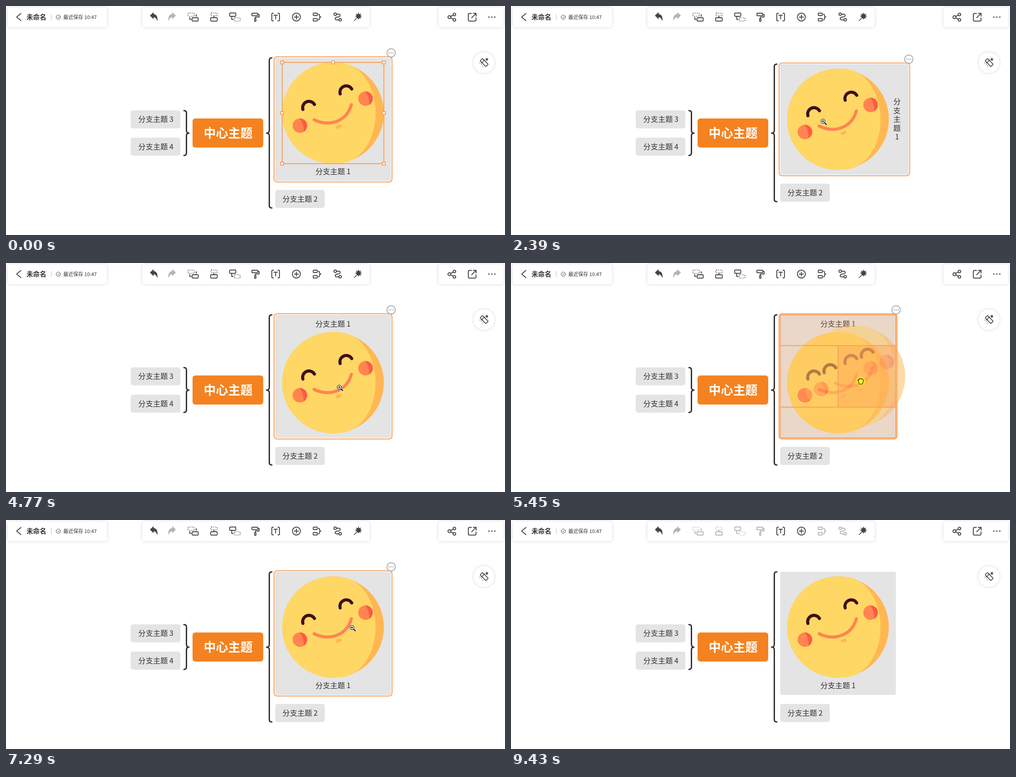
These frames come from a looping animation (1102x508 px, 9700 ms). An HTML page:

```html
<!DOCTYPE html>
<html lang="zh">
<head>
<meta charset="utf-8">
<title>Mind map</title>
<style>
  html, body { margin: 0; width: 100%; height: 100%; overflow: hidden; background: #fff; }
  svg { display: block; width: 1102px; height: 508px; }
  text { font: 350 16.3px "Noto Sans CJK SC", "Noto Sans CJK", sans-serif; fill: #333; text-anchor: middle; }
  .card { fill: #fff; filter: drop-shadow(0 0 3px rgba(0, 0, 0, .16)); }
  .node { fill: #e4e4e4; }
  .line, .icon { fill: none; stroke: #444; stroke-width: 1.9; stroke-linecap: round; stroke-linejoin: round; }
  .icon .solid { fill: #444; }
  .icon .dash { stroke-dasharray: 1.6 2.3; stroke-width: 1.7; stroke-linecap: butt; }
  .off .tool { stroke: #b4b4b4; }
  .off .tool .solid { fill: #b4b4b4; }
  .brace { fill: none; stroke: #333; stroke-width: 3; stroke-linecap: round; stroke-linejoin: round; }
  .accent { fill: none; stroke: #fa9f5a; stroke-width: 2; }
  .feature { fill: none; stroke-width: 6.8; stroke-linecap: round; }
  .zone { fill: #ff9f57; }
  #cursor { stroke: #111; stroke-width: 1.1; stroke-linejoin: round; fill: #fff; }
  #cursor.down { fill: #ffee3a; }
  #halo { fill: #f7e31f; fill-opacity: .88; stroke: none; }
</style>
</head>
<body>
<svg id="stage" viewBox="0 0 1102 508">
  <defs>
    <g id="cheek">
      <circle r="16" fill="#ff8450"/>
      <path d="M-1-16A16 16 0 0 1 8 13.9Q10-3-1-16Z" fill="#ff5a44"/>
    </g>
    <g id="face">
      <circle r="112.3" fill="#ffb752"/>
      <path d="M14-111.4A80 111.4 0 0 1 14 111.4A112.3 112.3 0 1 1 14-111.4Z" fill="#ffd765"/>
      <g class="feature" stroke="#3d1016">
        <path id="eye" d="M-66.5-8A14 14 0 0 1-41-19"/>
        <use href="#eye" x="82.3" y="-34.4"/>
      </g>
      <use href="#cheek" x="-73.2" y="28"/>
      <use href="#cheek" x="71.8" y="-32"/>
      <path class="feature" stroke="#ff8450" d="M-41.5 15C-10 31 30 20 40.5-18.5"/>
      <path class="feature" stroke="#ffb752" d="M9.5 31.5L15.5 29"/>
    </g>
  </defs>

  <!-- map -->
  <rect class="node" x="275.5" y="231.5" width="109.5" height="40" rx="5"/>
  <rect class="node" x="275.5" y="292" width="109.5" height="40" rx="5"/>
  <text x="331" y="257">分支主题 3</text>
  <text x="331" y="318">分支主题 4</text>
  <path class="brace" d="M393 232Q398.5 232 398.5 237V276Q398.5 282 404 282Q398.5 282 398.5 288V326Q398.5 331.5 393 331.5"/>
  <rect x="412" y="249.5" width="156" height="64.5" rx="6" fill="#f58220"/>
  <text x="490.5" y="292" style="font-size:27px;font-weight:700;fill:#fff">中心主题</text>
  <path class="brace" id="brace"/>
  <g id="second">
    <rect class="node" x="594.5" width="109.5" height="40" rx="5"/>
    <text x="649.5" y="26">分支主题 2</text>
  </g>
  <rect class="node" id="panel" x="594.5" rx="4"/>
  <use href="#face" id="image"/>
  <text id="across">分支主题 1</text>
  <text id="upright"></text>
  <g id="chosen">
    <rect class="accent" id="outline" x="592" rx="7"/>
    <g id="more">
      <circle r="9.3" fill="#fff" stroke="#aaa" stroke-width="1.9"/>
      <path d="M-4.3 0h.01M0 0h.01M4.3 0h.01" stroke="#999" stroke-width="2.4" stroke-linecap="round"/>
    </g>
  </g>
  <g id="handles" class="accent"><rect x="-112.3" y="-112.3" width="224.6" height="224.6"/></g>
  <use href="#face" id="ghost" opacity=".5"/>
  <g id="drop">
    <rect class="zone" id="wash" opacity=".2"/>
    <rect class="zone" id="target" opacity=".37"/>
    <path class="accent" id="grid"/>
  </g>

  <!-- bars -->
  <rect class="card" x="4" y="3" width="219" height="44" rx="5"/>
  <rect class="card" x="301" y="3" width="502" height="44" rx="5"/>
  <rect class="card" x="955" y="3" width="144" height="44" rx="5"/>
  <circle class="card" cx="1055.5" cy="125.5" r="23"/>
  <text x="67.2" y="29.5" style="font-size:14.7px;font-weight:700">未命名</text>
  <text x="163.5" y="28.5" style="font-size:11px">最近保存 10:47</text>
  <path d="M100 18V31" stroke="#bbb"/>
  <g class="icon">
    <path d="M33 16.5L23.5 24.5L33 32.5"/>
    <g stroke-width="1"><circle cx="115.6" cy="24.8" r="4.8"/><path d="M113.3 24.8l1.8 1.8 3-3.4"/></g>
    <path id="undo" class="solid" stroke-width="1" d="M318.5 21L325.5 14.5V18.3C331.5 18.6 334.5 23 334 32C332 27 330 24.7 325.5 24.5V28Z"/>
    <path d="M374.5 21L367.5 14.5V18.3C361.5 18.6 358.5 23 359 32C361 27 363 24.7 367.5 24.5V28Z" style="fill:#b4b4b4;stroke:#b4b4b4;stroke-width:1"/>
    <g class="tool">
      <rect class="dash" x="402" y="15.5" width="13.5" height="7.5" rx="1.5"/>
      <rect x="411" y="26" width="13.5" height="7.5" rx="1.5"/>
      <path d="M406 25.5V29.7H408.5M420 19.3V23"/>
    </g>
    <g class="tool">
      <rect class="dash" x="452.5" y="15.5" width="13.5" height="6.5" rx="1.5"/>
      <rect x="452" y="26" width="14.5" height="7.5" rx="1.5"/>
      <path d="M459.3 22.5V25.5"/>
    </g>
    <g class="tool">
      <rect x="494" y="15.5" width="13.5" height="7.5" rx="1.5"/>
      <rect class="dash" x="504" y="26" width="13" height="7.5" rx="1.5"/>
      <path d="M498.5 23.5V29.7H501.5"/>
    </g>
    <g class="tool">
      <rect x="543" y="16" width="13" height="5.5" rx="1"/>
      <path d="M556.5 18.7H559V24.5H550.5V27"/>
      <rect x="549" y="28" width="3" height="6" rx=".8"/>
    </g>
    <path d="M590.5 16H589Q587 16 587 18V31Q587 33 589 33H590.5M600.5 16H602Q604 16 604 18V31Q604 33 602 33H600.5M591.5 20.5H599.5M595.5 20.5V29"/>
    <circle cx="641.3" cy="24.5" r="8.8"/><path d="M636.8 24.5H645.8M641.3 20V29"/>
    <g class="tool">
      <rect x="678.5" y="15.8" width="9" height="5.5" rx="1"/>
      <rect x="678.5" y="27.8" width="9" height="5.5" rx="1"/>
      <path d="M690 18.5Q692.5 18.5 692.5 21V22.5Q692.5 24.5 695.5 24.5Q692.5 24.5 692.5 26.5V28Q692.5 30.5 690 30.5"/>
    </g>
    <g class="tool">
      <circle cx="727" cy="18.3" r="2.8"/><circle cx="738" cy="30.5" r="2.8"/>
      <path d="M730.5 18.3H735Q738.5 18.3 738 21.5Q737 24.5 732.5 24.5Q727.5 24.5 727 28Q727 30.8 730.5 30.8H734.5"/>
    </g>
    <g><circle class="solid" cx="778.5" cy="22.5" r="4.2"/>
      <path stroke-width="1.6" d="M778.5 15.5V29M771.7 22.5H785.3M773.7 17.7L783.3 27.3M783.3 17.7L769 32.5"/></g>
    <circle cx="979.3" cy="24.8" r="3.3"/><circle cx="990.3" cy="18.8" r="2.9"/><circle cx="990.3" cy="30.8" r="2.9"/>
    <path d="M982.3 23.2L987.7 20.2M982.3 26.4L987.7 29.4"/>
    <path d="M1028 16.5H1023.5Q1021 16.5 1021 19V31Q1021 33.5 1023.5 33.5H1035.5Q1038 33.5 1038 31V26.5M1032 16.2H1038.2V22.4M1038 16.4L1028.5 26"/>
    <path stroke-width="3" d="M1066.5 24.5h.01M1073 24.5h.01M1079.5 24.5h.01"/>
    <g transform="translate(1056 125.5)" style="stroke-width:1.7">
      <rect x="-9" y="-3.7" width="18" height="7.4" rx="1.2" transform="rotate(45)"/>
      <path d="M-6 1L1-6"/>
      <path class="solid" stroke-width=".6" d="M6-10.5l1 2 2 .6-1.6 1.4.2 2.2-1.8-1-2 .8.6-2-1.4-1.7 2.2-.2Z"/>
      <path d="M-9.5 1h.01M-6 4h.01M-3 8h.01"/>
    </g>
  </g>

  <g id="cursor">
    <circle id="halo" r="10"/>
    <path id="arrow" d="M0 0V15.5L3.7 12.2L6.2 17.7L8.5 16.7L6.1 11.4H11Z"/>
    <g id="zoom">
      <path d="M3.5 3L8 7.5" stroke="#fff" stroke-width="4.5"/>
      <circle cy="-.5" r="5.6" stroke="none"/>
      <path d="M3.5 3L8 7.5" stroke-width="2.4"/>
      <circle cy="-.5" r="4.6" stroke-width="1.2"/>
      <path d="M-2.5-.5H2.5M0-3V2" stroke-width="1.3"/>
    </g>
    <path id="hand" d="M-3.5 6.5Q-4-.5-6-1.5Q-6-3.5-3.6-2V-4Q-2.5-6.5-1-4.6Q.5-7 2-4.6Q4-6 4.6-3.6Q6.5-4 6 0Q5.8 3 4 6.5Z"/>
  </g>
</svg>
<script>
const LOOP = 9700;
const $ = id => document.getElementById(id);
const set = (id, attrs) => { for (const k in attrs) $(id).setAttribute(k, attrs[k]); };
const show = (id, on) => { $(id).style.display = on ? '' : 'none'; };
const move = (id, x, y) => set(id, { transform: `translate(${x} ${y})` });

// where the caption stands: box height, image centre, caption place
const LAYOUTS = {
  below: { y: 115, w: 255.5, h: 273, image: [722.2, 237.4], text: [722.2, 373] },
  above: { y: 115, w: 255.5, h: 273, image: [722.2, 265.4], text: [722.2, 141] },
  right: { y: 129, w: 283.5, h: 245, image: [722.2, 251.4], text: [852.5, 218], upright: true },
  left:  { y: 129, w: 283.5, h: 245, image: [750.2, 251.4], text: [620.5, 218], upright: true }
};
const STAGES = [[0, 'below'], [2390, 'right'], [3890, 'above'], [5720, 'left'], [7290, 'below']];
const DRAGS = [[1850, 2390], [3340, 3890], [5190, 5720], [6500, 7290]];
const PRESSES = [[1090, 1300], [1710, 2390], [2980, 3120], [3270, 3890], [4780, 4920],
  [5120, 5720], [6220, 6360], [6430, 7290], [7930, 8090]];
const HANDLES = [[0, 560], [1160, 1850], [3050, 3340], [4780, 5190], [6290, 6500]];
const DESELECT = 8020;

// pointer stops: time, x, y
const PATH = [
  [70, 1066, 496], [400, 900, 425], [540, 822, 388], [680, 750, 342], [890, 728, 250],
  [1500, 728, 250], [1640, 730, 247], [1850, 730, 247], [2060, 689, 256],
  [2660, 689, 256], [2900, 742, 276], [3340, 742, 276], [3690, 747, 298],
  [4220, 747, 298], [4600, 736, 276], [5190, 736, 276], [5450, 772, 262],
  [5790, 772, 262], [6070, 762, 264], [6500, 762, 264], [6960, 764, 239],
  [7360, 764, 239], [7850, 963, 298], [8950, 963, 298], [9430, 1080, 512]
];

const during = (spans, t) => spans.find(([a, b]) => t >= a && t < b);

function pointer(t) {
  const i = PATH.findIndex(p => p[0] > t);
  if (i < 0) return PATH[PATH.length - 1].slice(1);
  if (i === 0) return PATH[0].slice(1);
  const [a, x, y] = PATH[i - 1], [b, u, v] = PATH[i];
  const k = (t - a) / (b - a);
  return [x + (u - x) * k, y + (v - y) * k];
}

function layOut(name) {
  const { y, w, h, image, text, upright } = LAYOUTS[name];
  set('panel', { y, width: w, height: h });
  set('outline', { y: y - 2.5, width: w + 5, height: h + 5 });
  set('wash', { x: 594.5, y, width: w, height: h });
  move('more', 593.5 + w + 1.5, y - 11);
  move('image', ...image);
  move('handles', ...image);
  move('second', 0, y + h + 20);
  show('across', !upright);
  show('upright', upright);
  move(upright ? 'upright' : 'across', ...text);
  const end = y + h + 60;
  set('brace', { d: `M587 ${y}Q581.5 ${y} 581.5 ${y + 5}V276Q581.5 282 575.5 282Q581.5 282 581.5 288V${end - 5}Q581.5 ${end} 587 ${end}` });
}

// two full bands on the long sides, the middle split in half
function dropZones({ y, w, h, upright }, [px, py]) {
  const x = 594.5, r = x + w, b = y + h, cx = x + w / 2, cy = y + h / 2;
  const bandX = upright ? w / 4 : 0, bandY = upright ? 0 : h / 4;
  const l = x + bandX, rr = r - bandX, t = y + bandY, bb = b - bandY;
  const zone = upright
    ? (px < l ? [x, y, l, b] : px > rr ? [rr, y, r, b] : py < cy ? [l, y, rr, cy] : [l, cy, rr, b])
    : (py < t ? [x, y, r, t] : py > bb ? [x, bb, r, b] : px < cx ? [x, t, cx, bb] : [cx, t, r, bb]);
  set('target', { x: zone[0], y: zone[1], width: zone[2] - zone[0], height: zone[3] - zone[1] });
  const inner = upright
    ? `M${l} ${y}V${b}M${rr} ${y}V${b}M${l} ${cy}H${rr}`
    : `M${x} ${t}H${r}M${x} ${bb}H${r}M${cx} ${t}V${bb}`;
  set('grid', { d: `M${x} ${y}H${r}V${b}H${x}Z${inner}` });
}

let current;
function render(t) {
  const name = STAGES.filter(s => s[0] <= t).pop()[1];
  if (name !== current) layOut(current = name);
  const layout = LAYOUTS[name], [ix, iy] = layout.image;
  const [x, y] = pointer(t);
  const drag = during(DRAGS, t), down = during(PRESSES, t);

  show('chosen', t < DESELECT);
  $('stage').classList.toggle('off', t >= DESELECT);
  show('handles', during(HANDLES, t));
  show('ghost', drag);
  show('drop', drag);
  if (drag) {
    const [sx, sy] = pointer(drag[0]);
    move('ghost', ix + x - sx, iy + y - sy);
    dropZones(layout, [x, y]);
  }

  const over = Math.abs(x - ix) < 112 && Math.abs(y - iy) < 112;
  show('cursor', t >= 70 && t < 9430);
  move('cursor', x, y);
  $('cursor').classList.toggle('down', !!down);
  show('halo', down);
  show('hand', drag);
  show('zoom', !drag && over);
  show('arrow', !drag && !over);
}

$('upright').innerHTML = [...'分支主题1'].map((c, i) => `<tspan x="0" y="${i * 19.6}">${c}</tspan>`).join('');
for (const [x, y] of [[-1, -1], [0, -1], [1, -1], [-1, 0], [1, 0], [-1, 1], [1, 1]]) {
  $('handles').insertAdjacentHTML('beforeend',
    `<rect x="${x * 112.3 - 3.2}" y="${y * 112.3 - 3.2}" width="6.4" height="6.4" fill="#fff"/>`);
}

const start = performance.now();
function tick() {
  render((performance.now() - start) % LOOP);
  requestAnimationFrame(tick);
}
tick();
</script>
</body>
</html>
```
